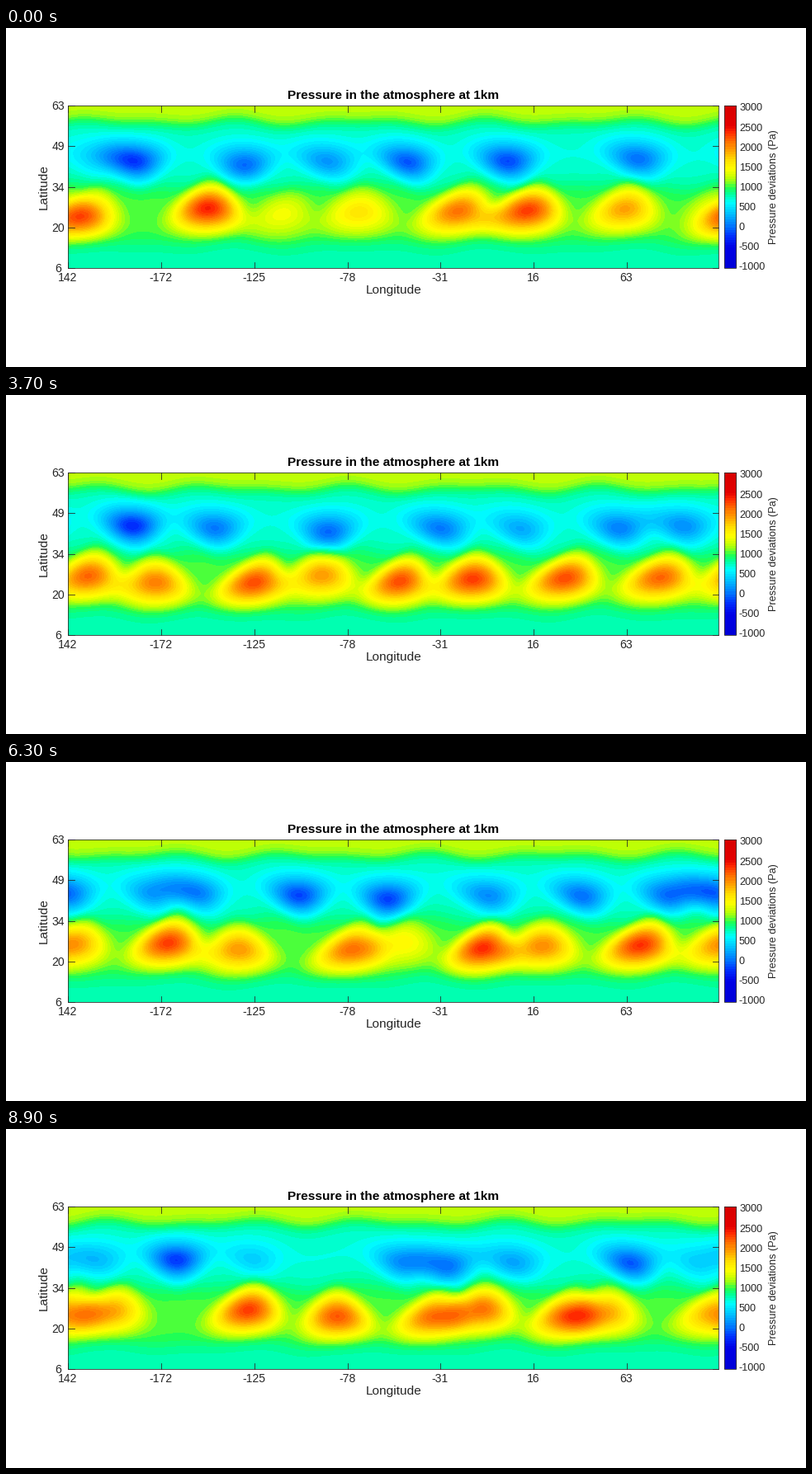
A matplotlib script that plays this animation: 969x411 px, repeating every 9000 ms.

```python
import matplotlib.pyplot as plt
import numpy as np
from matplotlib.animation import FuncAnimation
from matplotlib.colors import LinearSegmentedColormap
from matplotlib.patches import Rectangle

plt.rcParams["font.family"] = "Liberation Sans"

W, H = 969, 411
LEFT, RIGHT, TOP, BOTTOM = 75.5, 863.5, 94, 291
SPAN = RIGHT - LEFT
LOW, HIGH = -1041, 3041
STEPS = 90
INK = (0.15, 0.15, 0.15)

# Pressure (Pa) and its colour
RAMP = [
    (LOW, "#0000d8"), (-550, "#0000e6"), (-250, "#0030ff"), (0, "#0078ff"),
    (300, "#00beff"), (600, "#00ffff"), (820, "#00ff9c"), (980, "#22ff50"),
    (1120, "#90ff18"), (1260, "#ccff00"), (1450, "#ffff00"), (1680, "#ffe000"),
    (1900, "#ffaa00"), (2150, "#ff7000"), (2400, "#ff2800"), (2560, "#e40000"),
    (HIGH, "#d80000"),
]
cmap = LinearSegmentedColormap.from_list(
    "pressure", [((v - LOW) / (HIGH - LOW), c) for v, c in RAMP], N=64)

rng = np.random.default_rng(4)
X, Y = np.meshgrid(np.arange(LEFT + 1, RIGHT, 2), np.arange(TOP + 1, BOTTOM, 2))


def wrap(d):
    return (d + SPAN / 2) % SPAN - SPAN / 2


class Cell:
    """A pressure cell that drifts east round the belt, swelling and fading."""

    def __init__(self, sign, start, end, bend, *strength):
        self.sign, self.start, self.end, self.bend = sign, start, end, bend
        self.strength = strength
        self.y = (222 if sign > 0 else 162) + rng.uniform(-5, 5)
        self.size = rng.uniform(0.92, 1.08)
        self.lean = rng.uniform(-0.1, 0.4) * sign

    def pressure(self, step):
        s = step / (STEPS - 1)
        x = self.start + (self.end - self.start) * s + self.bend * np.sin(np.pi * s)
        amp = 100 * self.sign * np.interp(s, np.linspace(0, 1, 4), self.strength)
        dy = Y - self.y
        dx = wrap(X - x + self.lean * dy)
        # highs narrow towards the north, lows towards the south
        dx = dx / np.clip(1 + 0.012 * self.sign * dy, 0.45, 1.5) / self.size
        core = np.exp(-(dx / 27) ** 2 - (dy / 18) ** 2)
        shelf = np.exp(-((dx / 41) ** 2 + (dy / 33) ** 2) ** 2)
        share = 0.45 if self.sign > 0 else 0.25
        return amp * (share * shelf + (1 - share) * core)


# start x, end x, bend of the path, four strengths over the loop
cells = [Cell(+1, *c) for c in (
    (98, 517, 30, 9, 13, 11, 11), (245, 577, 0, 14, 11, 4, 11),
    (335, 678, 0, 4, 12, 14, 11), (428, 725, 15, 6, 14, 10, 9),
    (548, 860, 0, 11, 12, 14, 9), (632, 915, 45, 13, 12, 10, 9),
    (750, 1082, 0, 9, 11, 13, 13), (862, 1190, -30, 5, 11, 9, 12))]
cells += [Cell(-1, *c) for c in (
    (157, 482, -40, 9, 6, 9, 6), (289, 535, 0, 7.5, 7, 9, 7),
    (390, 615, 45, 5.5, 7, 6, 5), (487, 757, 25, 8, 4, 7, 8),
    (608, 840, 40, 8.5, 6, 8, 3), (766, 898, 0, 7, 5, 8, 4),
    (900, 995, 0, 3, 9, 5, 9), (855, 1088, 0, 0, 0, 7, 3))]


def background(step):
    phase = 2 * np.pi * (X - LEFT - 3.7 * step) / SPAN
    y = Y + 3 * np.sin(5 * phase) + 2 * np.sin(8 * phase + 1)
    return (790 + 430 * np.exp(-((y - 90) / 26) ** 4)
            + 230 * np.exp(-((y - 225) / 36) ** 4)
            - 110 * np.exp(-((y - 152) / 27) ** 2))


def field(step):
    return background(step) + sum(c.pressure(step) for c in cells)


fig = plt.figure(figsize=(W / 72, H / 72), dpi=72, facecolor="white")
ax = fig.add_axes([0, 0, 1, 1])
ax.axis("off")

look = dict(cmap=cmap, vmin=LOW, vmax=HIGH, aspect="auto")
sky = ax.imshow(field(0), extent=(LEFT, RIGHT, BOTTOM, TOP),
                interpolation="bilinear", **look)
bar = (870, 884.5)
ax.imshow(np.linspace(HIGH, LOW, 197)[:, None], extent=(*bar, BOTTOM, TOP),
          interpolation="nearest", **look)
ax.set(xlim=(0, W), ylim=(H, 0))


def box(x0, x1):
    ax.add_patch(Rectangle((x0, TOP - 0.5), x1 - x0, BOTTOM - TOP + 0.5,
                           fill=False, ec=INK, lw=0.8))


def line(x0, y0, x1, y1):
    ax.plot([x0, x1], [y0, y1], color=INK, lw=0.8)


def label(x, y, text, size, ha="center", **kw):
    ax.text(x, y, text, fontsize=size, ha=ha, va="baseline",
            rotation_mode="anchor", **{"color": INK, **kw})


box(LEFT, RIGHT)
box(*bar)
for i, lon in enumerate((142, -172, -125, -78, -31, 16, 63)):
    x = LEFT + 112.7 * i
    line(x, TOP, x, TOP + 7.5)
    line(x, BOTTOM, x, BOTTOM - 7.5)
    label(x - 0.5, 307, str(lon), 14)
for i, lat in enumerate((63, 49, 34, 20, 6)):
    y = TOP + 49.25 * i
    line(LEFT, y, LEFT + 7.5, y)
    line(RIGHT, y, RIGHT - 7.5, y)
    label(63.5, y + 5, str(lat), 14)
for i in range(9):
    label(888, 100.5 + 24.12 * i, str(3000 - 500 * i), 12.6, "left")

label(469, 86, "Pressure in the atmosphere at 1km", 15.4,
      weight="bold", color="black")
label(469.5, 322, "Longitude", 15.4)
label(50, 192.5, "Latitude", 15.4, rotation=90)
label(933, 193, "Pressure deviations (Pa)", 12.6, rotation=90)


def draw(step):
    sky.set_data(field(step))
    return (sky,)


anim = FuncAnimation(fig, draw, frames=STEPS, interval=100, repeat=True)
plt.show()
```
